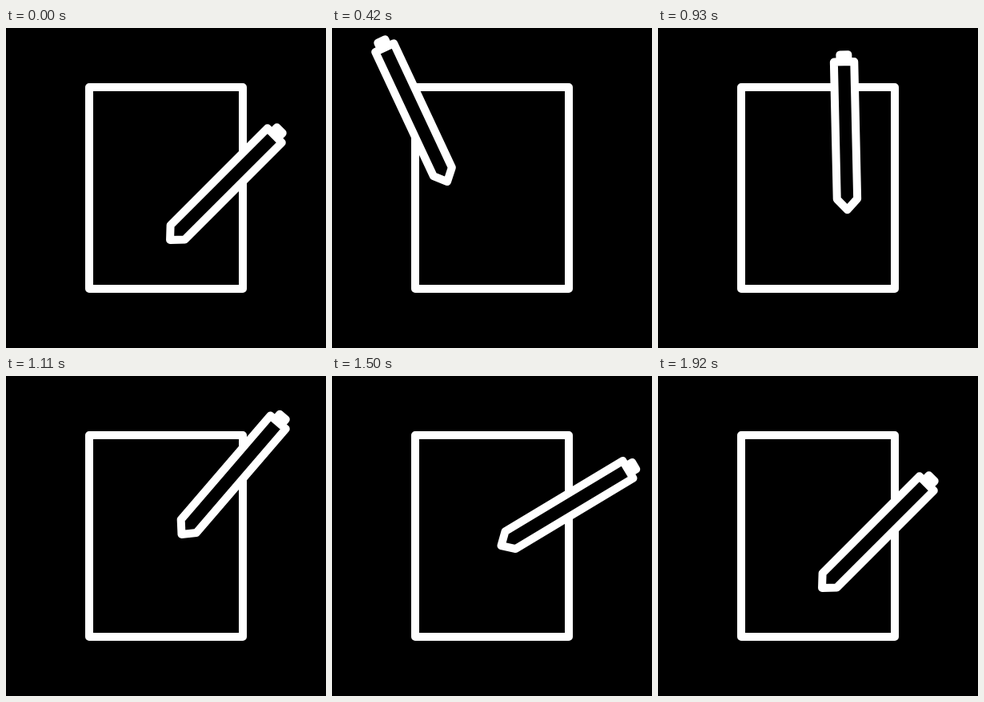
An HTML page for the animation above (1980 ms loop, 400 px wide and 400 px high).

```html
<!DOCTYPE html>
<html lang="en">
<head>
<meta charset="utf-8">
<title>Pen and paper</title>
<style>
  html, body { margin: 0; width: 100%; height: 100%; overflow: hidden; background: #000; }
  svg { display: block; width: 100vw; height: 100vh; }
  svg * { fill: #000; stroke: #fff; stroke-width: 10; stroke-linecap: round; stroke-linejoin: round; }
</style>
</head>
<body>
<svg viewBox="0 0 400 400">
  <rect x="104" y="74" width="192" height="252"/>
  <g id="pen">
    <path d="M-5-86V-94.7H5V-86Z"/>
    <path d="M-12.7-85.7H12.7V85.7L0 99.2L-12.7 85.7Z"/>
  </g>
</svg>
<script>
  const LOOP = 1980, STEP = 30;

  // time in ms, pen centre x, pen centre y, rotation in degrees
  const poses = [
    [0, 275.2, 194.8, 45],
    [420, 102, 102.2, -25.1],
    [540, 99.2, 119, -40],
    [660, 122.8, 135, -48.3],
    [930, 234.5, 128, -1.3],
    [1080, 281.3, 123.7, 36],
    [1290, 282.8, 120.4, 58.6],
    [1500, 296.5, 161, 59],
    [1620, 296.2, 193.4, 58],
    [1780, 275.2, 203, 52],
    [1920, 275.2, 194.8, 45]
  ];
  const last = poses.length - 1;
  const pen = document.getElementById('pen');

  // The pen rests at both ends of the loop and flows through the other poses.
  function slope(i, k) {
    if (i === 0 || i === last) return 0;
    const a = poses[i - 1], b = poses[i + 1];
    return (b[k] - a[k]) / (b[0] - a[0]);
  }

  function valueAt(t, i, k) {
    const a = poses[i], b = poses[i + 1];
    const span = b[0] - a[0];
    const u = (t - a[0]) / span, v = 1 - u;
    return a[k] * (1 + 2 * u) * v * v + b[k] * u * u * (3 - 2 * u)
      + span * u * v * (slope(i, k) * v - slope(i + 1, k) * u);
  }

  const start = performance.now();

  function draw() {
    const elapsed = (performance.now() - start) % LOOP;
    const t = Math.min(Math.floor(elapsed / STEP) * STEP, poses[last][0]);
    let i = 0;
    while (i < last - 1 && t >= poses[i + 1][0]) i++;
    const [x, y, angle] = [1, 2, 3].map(k => valueAt(t, i, k).toFixed(2));
    pen.setAttribute('transform', `translate(${x} ${y}) rotate(${angle})`);
    requestAnimationFrame(draw);
  }
  draw();
</script>
</body>
</html>
```
